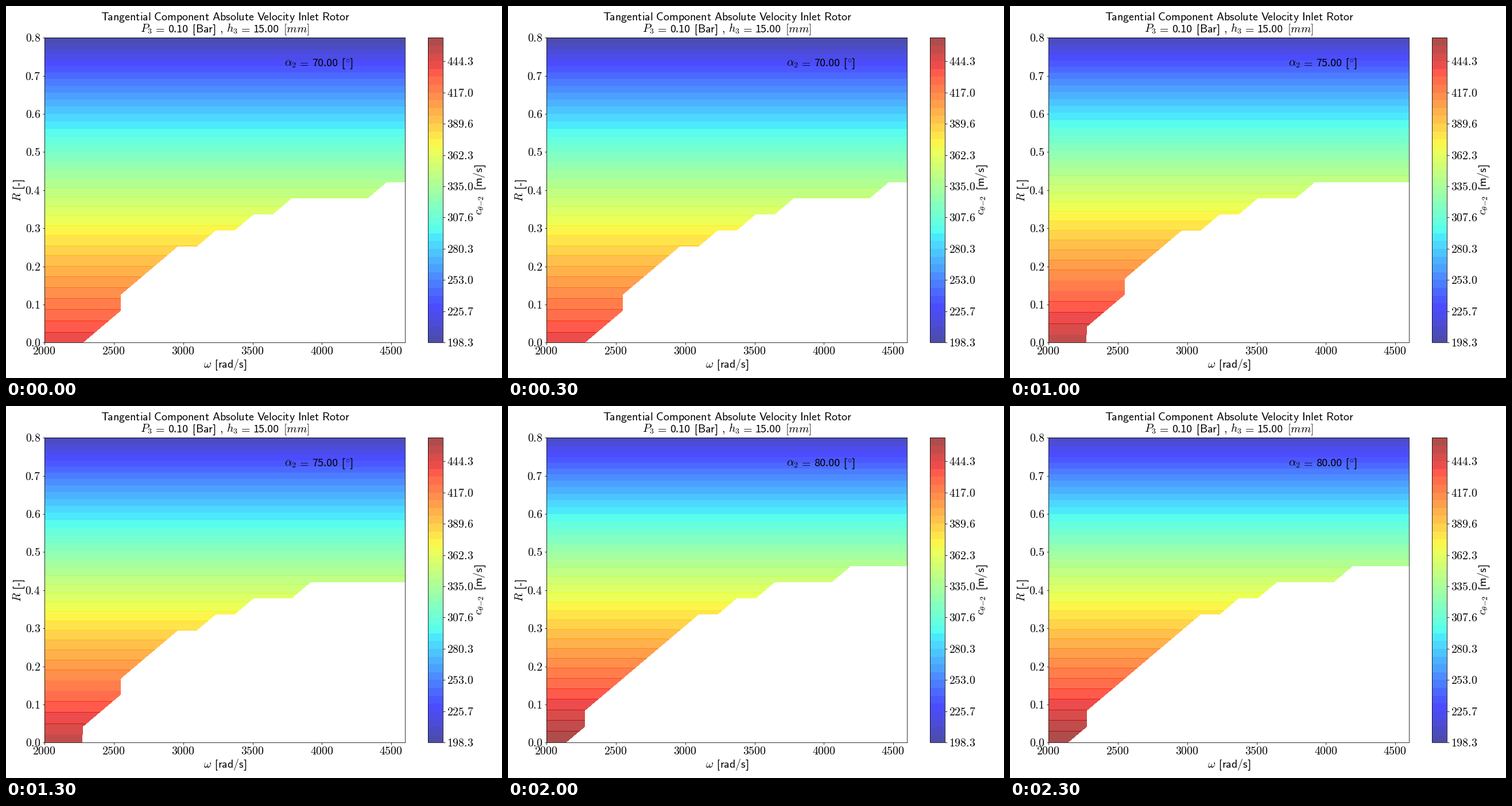
These frames come from a looping animation (864 px wide and 648 px high, 2500 ms). A matplotlib script:

```python
import numpy as np
import matplotlib.pyplot as plt
from matplotlib.animation import FuncAnimation

W, H, DPI = 864, 648, 72
LEFT, RIGHT, TOP, BOTTOM = 67.3, 695.4, 55.3, 586.3
CB_LEFT, CB_RIGHT = 734.7, 761.2
EM = 19.93
SPEED = 471.95
ANGLES = [70, 72.5, 75, 77.5, 80]

# Last valid speed index in each reaction row; rows above are full.
LIMITS = [
    [2, 3, 4, 4, 5, 6, 8, 10, 12, 17],
    [2, 3, 3, 4, 5, 6, 7, 9, 11, 14],
    [2, 2, 3, 4, 4, 5, 6, 8, 10, 13],
    [1, 2, 2, 3, 4, 5, 6, 7, 9, 12, 16],
    [1, 2, 2, 3, 4, 5, 6, 7, 9, 11, 15],
]

plt.rcParams["mathtext.fontset"] = "cm"

fig = plt.figure(figsize=(W / DPI, H / DPI), dpi=DPI, facecolor="white")


def pixel_axes(x0, x1):
    return fig.add_axes([x0 / W, 1 - BOTTOM / H, (x1 - x0) / W, (BOTTOM - TOP) / H])


ax = pixel_axes(LEFT, RIGHT)
cax = pixel_axes(CB_LEFT, CB_RIGHT)
page = fig.add_axes([0, 0, 1, 1], zorder=5)
page.set(xlim=(0, W), ylim=(H, 0))
page.axis("off")


def math(x, y, s, ha="left", turn=0):
    return page.text(x, y, f"${s}$", size=EM, ha=ha, va="baseline",
                     rotation=turn, rotation_mode="anchor")


def sans(x, y, s, turn=0):
    return math(x, y, r"\mathsf{%s}" % s, turn=turn)


def equals(x, y):
    # Mathtext pads a relation sign on both sides.
    return math(x - 0.176 * EM, y, "=")


def number(x, y, s):
    return page.text(x, y, s, size=18, family="Noto Sans CJK JP", va="baseline")


def stroke(x, y, pts, turn=0):
    """Draw a polyline given in em units from a text origin."""
    along, up = np.array(pts).T * EM
    if turn:
        xs, ys = x - up, y - along
    else:
        xs, ys = x + along, y - up
    page.plot(xs, ys, color="black", lw=1.4, solid_capstyle="butt",
              solid_joinstyle="miter")


def bracket(x, y, side, turn=0):
    stem, tip = (0.125, 0.26) if side == "[" else (0.164, 0.029)
    stroke(x, y, [(tip, 0.72), (stem, 0.72), (stem, -0.22), (tip, -0.22)], turn)


# Filled contours, one set per angle
omega = np.linspace(2000, 4600, 20)
react = np.linspace(0, 0.8, 20)
low = SPEED * np.sin(np.radians(ANGLES[0])) * np.sqrt(0.2)
high = SPEED * np.sin(np.radians(ANGLES[-1]))
levels = np.linspace(low, high, 40)
fill_levels = levels.copy()
fill_levels[0] -= 1e-6
fill_levels[-1] += 1e-6


def field(angle, limits):
    row = SPEED * np.sin(np.radians(angle)) * np.sqrt(1 - react)
    last = np.full(20, 19)
    last[:len(limits)] = limits
    z = np.repeat(row[:, None], 20, axis=1)
    return np.ma.masked_where(np.arange(20)[None, :] > last[:, None], z)


fills = [ax.contourf(omega, react, field(a, lim), levels=fill_levels,
                     cmap="jet", alpha=0.7, corner_mask=True)
         for a, lim in zip(ANGLES, LIMITS)]

# Axes, colour bar and tick labels
xticks = np.arange(2000, 4501, 500)
yticks = np.arange(9) / 10
ax.set(xlim=(2000, 4600), ylim=(0, 0.8), xticks=xticks, yticks=yticks)
bar = fig.colorbar(fills[0], cax=cax, ticks=levels[::4])
for a in (ax, cax):
    a.tick_params(labelbottom=False, labelleft=False, labelright=False)

for v in xticks:
    math(LEFT + (v - 2000) / 2600 * (RIGHT - LEFT) - 0.3, 607, f"{v}", "center")
for v in yticks:
    math(LEFT - 7, BOTTOM - v / 0.8 * (BOTTOM - TOP) + 7, f"{v:.1f}", "right")
for k in range(0, 40, 4):
    math(CB_RIGHT + 7, BOTTOM - k / 39 * (BOTTOM - TOP) + 7, f"{levels[k]:.1f}")

# Title, with the two capitals kerned
heading = "Tangential Component Absolute Velocity Inlet Rotor"
for old, new in ((" ", r"\hspace{0.335}"), ("Ta", r"T\hspace{-0.095}a"),
                 ("Ve", r"V\hspace{-0.095}e")):
    heading = heading.replace(old, new)
math(381.6, 25, r"\mathsf{%s}" % heading, "center")
y = 46
math(234.2, y, "P_3")
equals(261.0, y)
number(282.0, y, "0.10")
bracket(324.1, y, "[")
sans(329.8, y, "Bar")
bracket(359.5, y, "]")
math(371.9, y, ",")
math(383.9, y, "h_3")
equals(409.6, y)
number(430.6, y, "15.00")
math(482.6, y, "[mm]")

# Axis labels
y = 630
math(344.1, y, r"\omega")
bracket(363.3, y, "[")
sans(369.1, y, "rad/s")
bracket(413.4, y, "]")

x, y = 26.3, 341
math(x, y, "R", turn=90)
bracket(x, y - 21.8, "[", 90)
stroke(x, y - 27.5, [(0.01, 0.23), (0.28, 0.23)], 90)
bracket(x, y - 34.2, "]", 90)

x, y = 830, 364.5
math(x, y, r"c_{\theta{-}2}", turn=90)
bracket(x, y - 44, "[", 90)
sans(x, y - 49.6, "m/s", 90)
bracket(x, y - 83, "]", 90)

# Angle readout
y = 105
math(485.2, y, r"\alpha_2")
equals(511.9, y)
readout = number(533.0, y, "")
bracket(585.0, y, "[")
math(590.8, y, r"^{\circ}")
bracket(598.6, y, "]")


def update(i):
    for k, fill in enumerate(fills):
        fill.set_visible(k == i)
    readout.set_text(f"{ANGLES[i]:.2f}")
    return [*fills, readout]


anim = FuncAnimation(fig, update, frames=len(ANGLES), interval=500,
                     repeat=True, repeat_delay=0, blit=False)
plt.show()
```
